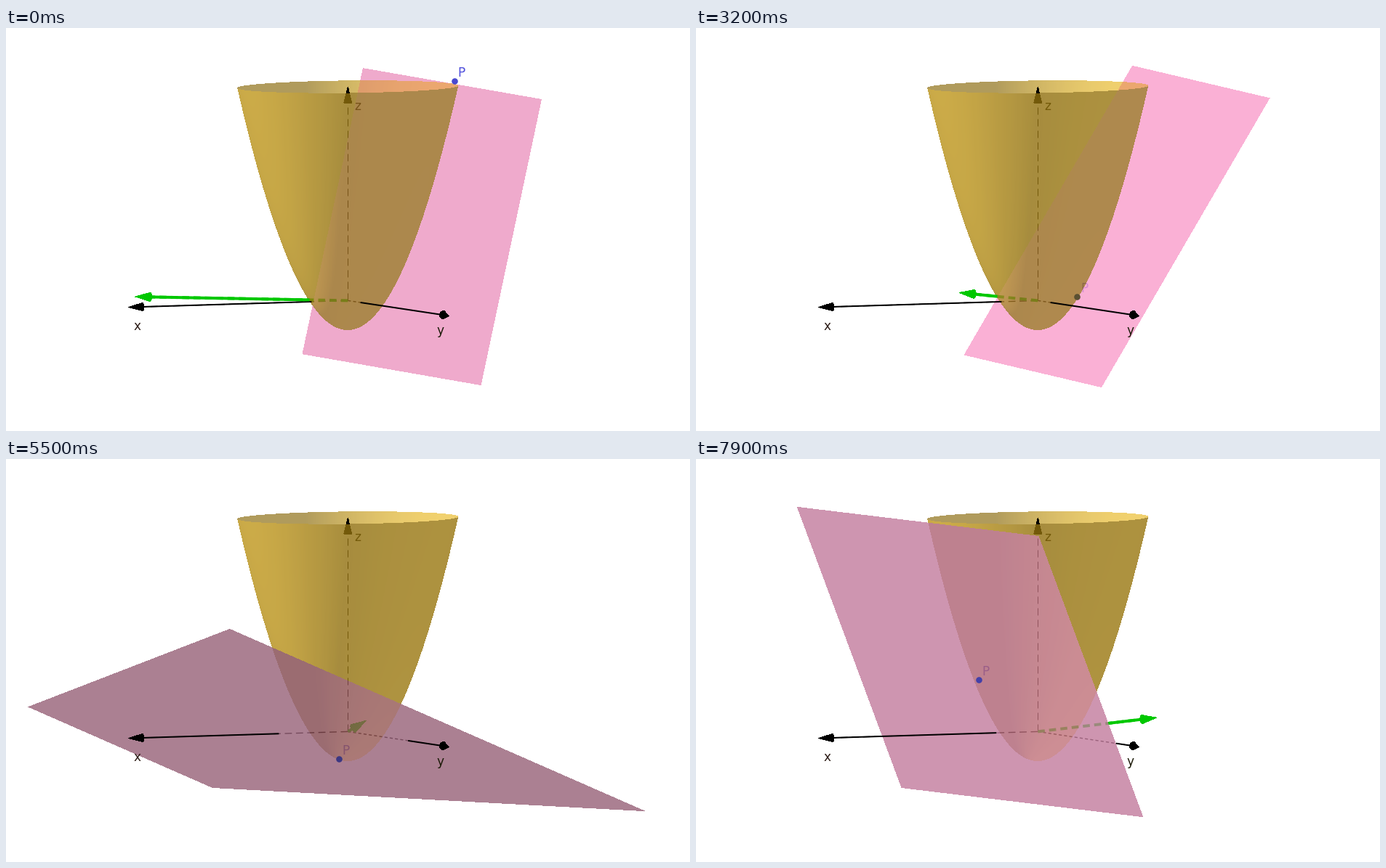
Animation of 941 by 555 pixels, one loop 8000 ms. Source, as a matplotlib script:

```python
import numpy as np
import matplotlib.pyplot as plt
from matplotlib.animation import FuncAnimation
from matplotlib.collections import PolyCollection

W, H, DPI = 941, 555, 100
FRAMES, STEP = 80, 100
PX = 72 / DPI

# Parallel projection: screen vectors of the three axes
ORIGIN = np.array([470.3, 375.4])
AXES = np.array([[-28.85, 0.877], [10.07, 1.52], [0, -13.54]])
BOX_X, BOX_Y, Z_LOW, Z_TOP = 10.45, 13.8, -7.17, 21.75
C = -3.0          # surface z = x^2 + y^2 + C
PY = 0.2          # fixed y of the moving point

INV = np.linalg.inv(AXES[:2])
VX, VY = -AXES[2] @ INV
VIEW = np.array([VX, VY, 1.0])
A = VX**2 + VY**2

# Lighting: each face has a shaded and a fully lit colour, T passes through
T = 0.2
LIGHT, BIAS = np.array([0.7, 0.1, 1.33]), -0.19
GOLD = np.array([[125, 104, 41], [202, 168, 63]], np.float32)
PINK = np.array([[120, 77, 95], [202, 127, 165]], np.float32)
BLUE = np.array([[60, 55, 130], [77, 77, 222]], np.float32)
PEACH = np.array([230, 125, 112], np.float32)


def project(p):
    return ORIGIN + np.asarray(p) @ AXES


def lerp(a, b, m):
    return a + (b - a) * m


def lit(shades, n):
    """Colour of a face with normal n (last axis)."""
    n = n / np.linalg.norm(n, axis=-1, keepdims=True)
    g = np.sin(np.pi / 2 * np.clip(n @ LIGHT + BIAS, 0, 1))
    return lerp(shades[0], shades[1], g[..., None]).astype(np.float32)


def glaze(base, face, m):
    """Lay a translucent face over base where m is set."""
    return lerp(base, base * T + face, m)


def roots(x, y, z):
    """Where the view rays through the points meet the paraboloid."""
    b = 2 * (x * VX + y * VY) - 1
    disc = b * b - 4 * A * (x * x + y * y + C - z)
    q = np.sqrt(np.maximum(disc, 0))
    return disc > 0, (-b - q) / (2 * A), (-b + q) / (2 * A)


def normal(x, y):
    return np.stack([2 * x, 2 * y, -np.ones_like(x)], -1)


# Points on z = 0 under each pixel, and the fixed layers of the bowl
SX, SY = np.meshgrid(np.arange(W) + 0.5 - ORIGIN[0], np.arange(H) + 0.5 - ORIGIN[1])
GX = (SX * INV[0, 0] + SY * INV[1, 0]).astype(np.float32)
GY = (SX * INV[0, 1] + SY * INV[1, 1]).astype(np.float32)
HIT, S1, S2 = roots(GX, GY, 0)
WHOLE = (HIT & (S1 < Z_TOP))[..., None].astype(np.float32)
FRONT = (HIT & (S2 < Z_TOP))[..., None].astype(np.float32)
OUTER = lit(GOLD, normal(GX + VX * S2, GY + VY * S2))
INNER = lit(GOLD, -normal(GX + VX * S1, GY + VY * S1))
WHITE = np.full((H, W, 3), 255, np.float32)
BACK = glaze(WHITE, INNER, WHOLE)
BOWL = glaze(BACK, OUTER, FRONT)


def tangent(x):
    """Contact point and normal of the tangent plane."""
    return np.array([x, PY, x * x + PY * PY + C]), np.array([2 * x, 2 * PY, -1])


def in_box(x, y, z):
    return (abs(x) < BOX_X) & (abs(y) < BOX_Y) & (z > Z_LOW) & (z < Z_TOP)


def surfaces(x):
    p, n = tangent(x)
    facing = n @ VIEW
    s = (n @ p - GX * n[0] - GY * n[1]) / facing
    m = in_box(GX + VX * s, GY + VY * s, s)[..., None].astype(np.float32)
    face = lit(PINK, n * np.sign(facing))
    if facing > 0:
        rgb = lerp(BOWL, BACK * T + face, m)
    else:
        rgb = glaze(BACK, face, m)
        rim = lerp(BACK, PEACH, 0.5 * m)
        rgb = lerp(rgb, rim, WHOLE - FRONT)
        rgb = glaze(rgb, OUTER, FRONT)
    # Leave the faces translucent, so hidden lines show through
    a = (1 - T) * np.maximum(m, WHOLE)
    rgb = (rgb - 255 * (1 - a)) / np.maximum(a, 1e-3)
    out = np.concatenate([rgb, a * 255], -1)
    return np.clip(out + 0.5, 0, 255).astype(np.uint8)


def visible(pts, x):
    """True where nothing stands between a point and the viewer."""
    px, py, pz = pts.T
    hit, s1, s2 = roots(px, py, pz)
    hidden = np.zeros(len(pts), bool)
    for s in (s1, s2):
        hidden |= hit & (s > 1e-3) & (pz + s < Z_TOP)
    p, n = tangent(x)
    s = (p - pts) @ n / (n @ VIEW)
    hidden |= (s > 1e-3) & in_box(*(pts + s[:, None] * VIEW).T)
    return ~hidden


fig = plt.figure(figsize=(W / DPI, H / DPI), dpi=DPI, facecolor="white")
ax = fig.add_axes([0, 0, 1, 1])
ax.axis("off")


class Arrow:
    """Line with a cone head: dashed below the surfaces, solid above them."""

    def __init__(self, color, width, thin, dash, head, bulge, radius=5.5):
        self.head, self.radius, self.bulge = head, radius, bulge
        self.low, = ax.plot([], [], color=color, lw=thin * PX, ls=(0, dash),
                            dash_capstyle="butt", zorder=1)
        self.top, = ax.plot([], [], color=color, lw=width * PX,
                            solid_capstyle="butt", zorder=5)
        self.cones = [PolyCollection([], facecolor=color, edgecolor="none",
                                     antialiased=False, zorder=z) for z in (1, 5)]
        for c in self.cones:
            ax.add_collection(c)

    def profile(self, q):
        b = self.bulge
        base = np.sqrt(np.maximum(1 - ((q - b) / b) ** 2, 0))
        return self.radius * np.where(q < b, base, (1 - q) / (1 - b))

    def update(self, tip, x):
        tip = np.asarray(tip, float)
        d = project(tip) - ORIGIN
        length = np.hypot(*d)
        neck = max(0, 1 - self.head / length)
        q = np.linspace(0, neck, 400)[:, None]
        xy = project(q * tip)
        self.low.set_data(*xy.T)
        self.top.set_data(*np.where(visible(q * tip, x)[:, None], xy, np.nan).T)

        e = np.linspace(0, 1, 25)
        mid = project((neck + (1 - neck) * e)[:, None] * tip)
        off = np.array([-d[1], d[0]]) / length * self.profile(e)[:, None]
        a, b = mid + off, mid - off
        quads = np.stack([a[:-1], a[1:], b[1:], b[:-1]], 1)
        center = neck + (1 - neck) * (e[:-1] + e[1:]) / 2
        seen = visible(center[:, None] * tip, x)
        self.cones[0].set_verts(list(quads))
        self.cones[1].set_verts(list(quads[seen]))


def label(s, x, y, color, z):
    return ax.text(x, y, s, color=color, fontsize=17 * PX, family="DejaVu Sans",
                   ha="center", va="center", zorder=z)


image = ax.imshow(np.zeros((H, W, 4), np.uint8), extent=(0, W, H, 0),
                  interpolation="nearest", zorder=3)
ax.set(xlim=(0, W), ylim=(H, 0), aspect="auto")

axis_arrows = [
    (Arrow("black", 2, 1.4, (7, 4), 21, .1), (BOX_X, 0, 0)),
    (Arrow("black", 2, 1.4, (3, 2.2), 13, .45), (0, BOX_Y, 0)),
    (Arrow("black", 2, 1, (10, 6), 23, .02), (0, 0, Z_TOP)),
]
gradient = Arrow("#00c800", 4, 4, (2.4, 1.5), 23, .12, 6)
label("x", 181, 410.5, "#2b1a14", 6)
label("y", 597, 417.5, "#1c1a08", 6)
label("z", 484, 108, "black", 1)
name = label("P", 0, 0, "#5050dc", 1)
dot, = ax.plot([], [], "o", ms=8.6 * PX, mew=0, zorder=6)


def draw(i):
    x = i * STEP / 1000 - 5
    image.set_data(surfaces(x))
    for arrow, tip in axis_arrows:
        arrow.update(tip, x)
    gradient.update((-2 * x, -2 * PY, 1), x)

    p, n = tangent(x)
    px, py = project(p)
    dot.set_data([px], [py])
    shade = lit(BLUE, n * np.sign(n @ VIEW)) / 255
    dot.set_color(tuple(shade) if visible(p[None], x)[0] else "#5a5032")
    name.set_position((px + 10, py - 11))


anim = FuncAnimation(fig, draw, frames=FRAMES, interval=STEP, repeat=True)
plt.show()
```
